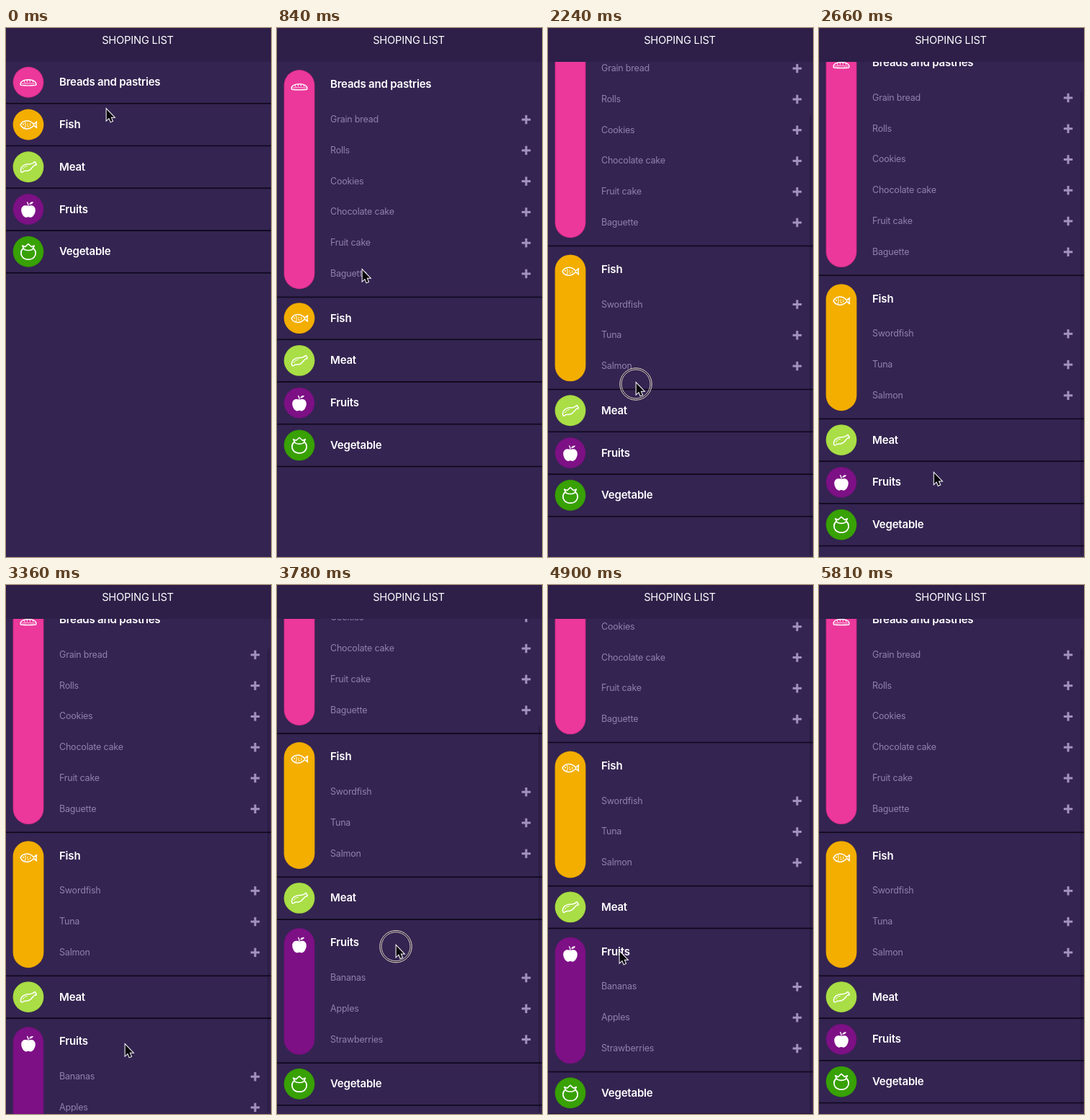
These frames come from a looping animation (368x734 px, 5880 ms). An HTML page with a canvas:

```html
<!DOCTYPE html>
<html lang="en">
<head>
<meta charset="utf-8">
<title>Shopping list</title>
<style>
html, body { margin: 0; width: 100%; height: 100%; overflow: hidden; background: #342451; }
canvas { display: block; width: 368px; height: 734px; }
</style>
</head>
<body>
<canvas id="stage"></canvas>
<script>
const W = 368, H = 734, LOOP = 5880, HEADER = 47;
const CLOSED = 58.75, OPEN_BASE = 70.8, ITEM = 42.77;
const FONT = 'Inter, Roboto, sans-serif';
const canvas = document.getElementById('stage');
const ctx = canvas.getContext('2d');
const scale = window.devicePixelRatio || 1;
canvas.width = W * scale;
canvas.height = H * scale;

// open / close: [start, end] in ms
const rows = [
  { name: 'Breads and pastries', color: '#ec389b', edge: '#d42b88', icon: bread, open: [250, 600],
    items: ['Grain bread', 'Rolls', 'Cookies', 'Chocolate cake', 'Fruit cake', 'Baguette'] },
  { name: 'Fish', color: '#f3ae00', edge: '#eaa500', icon: fish, open: [1330, 1690],
    items: ['Swordfish', 'Tuna', 'Salmon'] },
  { name: 'Meat', color: '#aade46', edge: '#a2d63f', icon: meat, items: [] },
  { name: 'Fruits', color: '#7e1086', edge: '#6d1279', icon: apple, open: [2960, 3300], close: [4910, 5230],
    items: ['Bananas', 'Apples', 'Strawberries'] },
  { name: 'Vegetable', color: '#38a104', edge: '#349607', icon: tomato, items: [] }
];

// [time, offset]
const scrollKeys = [
  [0, 0], [1960, 0], [2240, 71], [2320, 74], [2650, 30.2], [3430, 30.2],
  [3850, 178], [4030, 171.4], [4820, 171.4], [5200, 30.2]
];

// [time, x, y]
const cursorKeys = [
  [0, 139, 112], [180, 136, 84], [330, 136, 84], [840, 118, 335], [1060, 122, 405],
  [1330, 122, 405], [1900, 122, 600], [2240, 122, 492], [2330, 122, 486], [2760, 165, 637],
  [3430, 165, 637], [3850, 165, 489], [4300, 165, 489], [4760, 99, 508], [5150, 99, 508],
  [5600, -26, 470]
];

const presses = [[170, 330], [1180, 1340], [1920, 2320], [2850, 2960], [3430, 3880], [4760, 4860]];

const mix = (a, b, p) => a + (b - a) * p;

function ease(t, a, b) {
  const p = Math.min(1, Math.max(0, (t - a) / (b - a)));
  return p * p * (3 - 2 * p);
}

function sample(keys, t) {
  const i = keys.findIndex(k => k[0] > t);
  if (i < 0) return keys[keys.length - 1].slice(1);
  const a = keys[i - 1], b = keys[i], p = ease(t, a[0], b[0]);
  return a.slice(1).map((v, n) => mix(v, b[n + 1], p));
}

function openness(row, t) {
  if (!row.open) return 0;
  return ease(t, ...row.open) - (row.close ? ease(t, ...row.close) : 0);
}

function text(str, x, y, size, weight, color, align = 'left') {
  ctx.font = `${weight} ${size}px ${FONT}`;
  ctx.letterSpacing = '-0.2px';
  ctx.textAlign = align;
  ctx.fillStyle = color;
  ctx.fillText(str, x, y);
}

function line(d, width = 1.4) {
  ctx.lineWidth = width;
  ctx.stroke(new Path2D(d));
}

function bread() {
  line('M-10.5 3.8C-12 .5-9-3.6 0-3.8 9-3.6 12 .5 10.5 3.8Q0 4.8-10.5 3.8Z');
  line('M-6-2.6l1 2.6M-2-3.4l.5 2.6M2-3.4l.5 2.6M6-2.6l.6 2.2', 1);
  line('M-9 1.6Q0 .8 9 1.6', .7);
}

function fish() {
  line('M-11 0C-7-7.5 2-7 7.5-.8L11.5-4.2Q10.3 0 11.5 4.2L7.5.8C2 7-7 7.5-11 0Z', 1.5);
  line('M-4.6-4Q-2.6 0-4.6 4M-1-1.8Q0-.8-1 0M-1 1.2Q1 1.4 0 3M2.6-1.6Q3.6 0 2.6 1.6', 1);
  ctx.beginPath();
  ctx.arc(-7, -.8, 1, 0, 7);
  ctx.fill();
}

function meat() {
  line('M-10.5 5C-11-.5-5.5-4.8 1-4.2 4-4 5.6-5.4 7.6-6.2 8-8 10.6-7.6 10-5.4 12.2-4.8 11.4-2.2 9-3 6.5-1.4 5.2 1.8 1.8 4 -2 6.6-5.4 4-7.2 6.2-8.6 7.8-10.4 7-10.5 5Z', 1.5);
  line('M-7.4 2.6Q-5.8-1.4-1.6-1.6', 1);
}

function apple() {
  ctx.fill(new Path2D('M0-4.2C3-6.8 9.8-5.8 9.8.8 9.8 6.2 6 11 3 11 1.6 11 1 10.3 0 10.3-1 10.3-1.6 11-3 11-6 11-9.8 6.2-9.8.8-9.8-5.8-3-6.8 0-4.2Z'));
  ctx.fill(new Path2D('M1-7Q2.6-11 7-10.4 5.6-6.8 1-7Z'));
  line('M0-4Q.4-7.5-1.4-10', 1.4);
}

function tomato() {
  line('M-6.6-5.2C-11-2-11.2 3.6-8 7.4-4.4 11.6 4.4 11.6 8 7.4 11.2 3.6 11-2 6.6-5.2', 1.8);
  line('M-8.4-8.6L-4.4-7 0-11 4.4-7 8.4-8.6 5.8-3.4Q0-.8-5.8-3.4Z', 1.6);
}

function plus(x, y) {
  ctx.fillStyle = '#a392c1';
  ctx.fillRect(x - 6.2, y - 1.5, 12.4, 3);
  ctx.fillRect(x - 1.5, y - 6.2, 3, 12.4);
}

function drawRow(row, top, height, p) {
  ctx.save();
  ctx.beginPath();
  ctx.rect(0, top, W, height);
  ctx.clip();

  const pillTop = top + mix(6.8, 11, p);
  const pillEnd = top + height - mix(9.1, 12.2, p);
  ctx.beginPath();
  ctx.roundRect(9.6, pillTop, 42.8, pillEnd - pillTop, 21.4);
  ctx.fillStyle = row.edge;
  ctx.fill();
  ctx.beginPath();
  ctx.roundRect(10.6, pillTop + 1, 40.8, pillEnd - pillTop - 2, 20.4);
  ctx.fillStyle = row.color;
  ctx.fill();

  ctx.save();
  ctx.translate(31, top + mix(28.6, 34.4, p));
  ctx.strokeStyle = ctx.fillStyle = '#fff';
  ctx.lineJoin = ctx.lineCap = 'round';
  row.icon();
  ctx.restore();

  text(row.name, 74, top + mix(33.3, 36.4, p), 15, 600, '#fff');

  if (p > 0) {
    ctx.globalAlpha = p;
    row.items.forEach((item, i) => {
      const y = top + 79.8 + i * ITEM;
      text(item, 74, y + 4.3, 12.5, 400, '#9080ae');
      plus(346, y + .3);
    });
    ctx.globalAlpha = 1;
  }

  ctx.fillStyle = '#0e081c';
  ctx.fillRect(0, top + height - 1.8, W, 1.8);
  ctx.restore();
}

function drawCursor(x, y, pressed) {
  if (pressed) {
    for (const [r, color] of [[21.2, '#1c122e'], [22.2, '#e9e3cf'], [20, '#d8d0c4']]) {
      ctx.beginPath();
      ctx.arc(x, y + 2, r, 0, Math.PI * 2);
      ctx.strokeStyle = color;
      ctx.lineWidth = 1;
      ctx.stroke();
    }
  }
  ctx.save();
  ctx.translate(x, y);
  const arrow = new Path2D('M.6.8V16L4.1 12.7 6.4 18.2 8.9 17.1 6.6 11.8H11.2Z');
  ctx.lineJoin = 'miter';
  ctx.strokeStyle = '#fff';
  ctx.lineWidth = 2;
  ctx.stroke(arrow);
  ctx.fillStyle = '#08060c';
  ctx.fill(arrow);
  ctx.restore();
}

function draw(t) {
  ctx.setTransform(scale, 0, 0, scale, 0, 0);
  ctx.fillStyle = '#342451';
  ctx.fillRect(0, 0, W, H);

  const [scroll] = sample(scrollKeys, t);
  ctx.save();
  ctx.beginPath();
  ctx.rect(0, HEADER, W, H - HEADER);
  ctx.clip();
  let top = HEADER - scroll;
  for (const row of rows) {
    const p = openness(row, t);
    const height = mix(CLOSED, OPEN_BASE + ITEM * row.items.length, p);
    drawRow(row, top, height, p);
    top += height;
  }
  if (scroll > 0) {
    ctx.fillStyle = 'rgba(10, 4, 24, .2)';
    ctx.beginPath();
    ctx.roundRect(363, 65 + scroll * .78, 3, 666 - scroll * .78, 1.5);
    ctx.fill();
  }
  ctx.restore();

  ctx.fillStyle = '#2d1f48';
  ctx.fillRect(0, 0, W, HEADER);
  text('SHOPING LIST', 183, 22, 14.7, 400, '#fff', 'center');

  const [x, y] = sample(cursorKeys, t);
  drawCursor(x, y, presses.some(([a, b]) => t >= a && t < b));
}

const start = performance.now();
function tick() {
  draw((performance.now() - start) % LOOP);
  requestAnimationFrame(tick);
}
tick();
</script>
</body>
</html>
```
